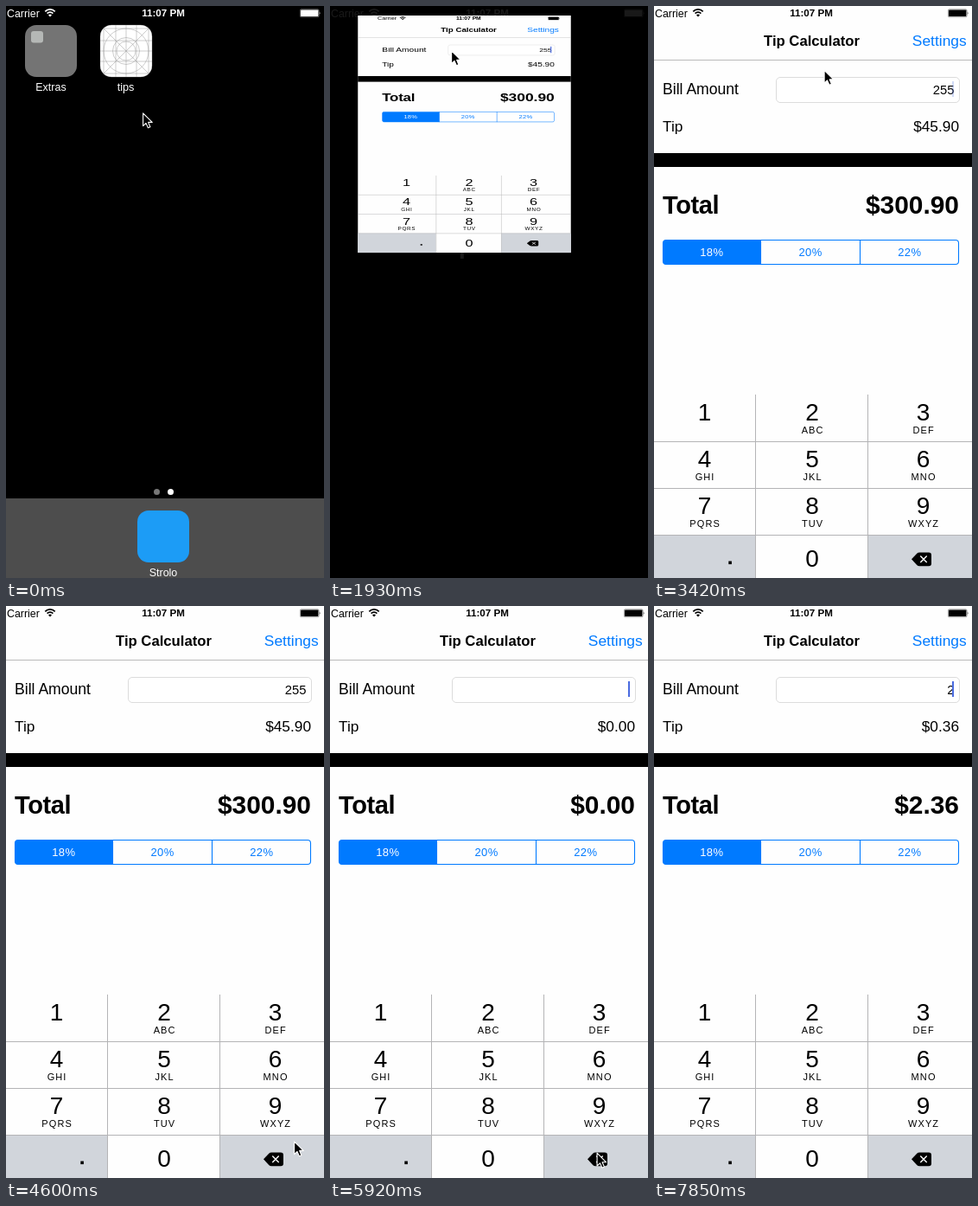
Recreate the animation shown at these times as an HTML page. Size 368x661 px, loop 8 s.

```html
<!DOCTYPE html>
<html lang="en">
<head>
<meta charset="utf-8">
<title>Tip Calculator</title>
<style>
html, body { margin: 0; width: 100%; height: 100%; overflow: hidden; background: #000; }
svg { display: block; width: 368px; height: 661px; }
text { font-family: "Liberation Sans", Arial, sans-serif; white-space: pre; }
</style>
</head>
<body>
<svg id="stage" viewBox="0 0 368 661" xmlns="http://www.w3.org/2000/svg"></svg>
<script>
const LOOP = 8000, START = 1050, STEP = 147.8, BLUE = '#007aff', KEY_GRAY = '#d1d5db';

// ---- markup helpers ----
const rect = (x, y, w, h, fill, extra = '') =>
  `<rect x="${x}" y="${y}" width="${w}" height="${h}" fill="${fill}" ${extra}/>`;
const text = (x, y, size, str, extra = '') =>
  `<text x="${x}" y="${y}" font-size="${size}" ${extra}>${str}</text>`;
const path = (d, extra = '') => `<path d="${d}" ${extra}/>`;
const circle = (x, y, r, extra = '') => `<circle cx="${x}" cy="${y}" r="${r}" ${extra}/>`;
const MID = 'text-anchor="middle"', END = 'text-anchor="end"', BOLD = 'font-weight="bold"';

function statusBar(color) {
  return `<g fill="${color}">` +
    text(1, 12.6, 12.4, 'Carrier') +
    path('M45.3 6.3a8 8 0 0 1 11.4 0M47.6 8.6a4.8 4.8 0 0 1 6.8 0',
      `fill="none" stroke="${color}" stroke-width="1.7"`) +
    path('M51 12.4l-2-2a2.8 2.8 0 0 1 4 0z') +
    text(182, 12.4, 11.6, '11:07 PM', `${MID} ${BOLD}`) +
    rect(340.3, 3.8, 21.8, 9, 'none', `rx="1.5" stroke="${color}" stroke-width=".6" opacity=".6"`) +
    rect(341, 4.5, 20.4, 7.6, color, 'rx=".8"') +
    path('M362.8 6.6q1.4 1.6 0 3.3z') + '</g>';
}

function gridIcon() {
  let d = 'M109 22l60 60M169 22l-60 60';
  for (const p of [4, 18, 30, 42, 56]) d += `M${109 + p} 22v60M109 ${22 + p}h60`;
  return rect(109, 22, 60, 60, '#fff', 'rx="13"') +
    '<g clip-path="url(#tile)" fill="none" stroke="#999" stroke-width=".5">' + path(d) +
    [11, 15.5, 26].map(r => circle(139, 52, r)).join('') + '</g>' +
    rect(109.2, 22.2, 59.6, 59.6, 'none', 'rx="12.8" stroke="#bbb" stroke-width=".4"') +
    rect(109, 22, 60, 60, '#000', 'rx="13" id="tint"');
}

function homeScreen() {
  return rect(22, 22, 60, 60, '#747474', 'rx="13"') +
    rect(29, 29, 14, 13.5, '#b5b8b6', 'rx="3"') +
    gridIcon() +
    circle(174.5, 561.5, 3.5, 'fill="#777"') + circle(190.5, 561.5, 3.5, 'fill="#fff"') +
    rect(-300, 569, 1000, 300, '#4d4d4d') +
    rect(152, 583, 60, 60, '#1c9cf6', 'rx="13"') +
    `<g fill="#fff" ${MID}>` + text(52, 98, 12.5, 'Extras') +
    text(138.5, 98, 12.7, 'tips') + text(182, 659, 12.5, 'Strolo') + '</g>';
}

function keypad() {
  const cols = [58.5, 183, 311.5];
  const letters = ['', 'ABC', 'DEF', 'GHI', 'JKL', 'MNO', 'PQRS', 'TUV', 'WXYZ'];
  let s = rect(-300, 611, 417, 55, KEY_GRAY) +
    rect(247, 611, 421, 55, KEY_GRAY, 'id="delKey"') +
    rect(118, 449, 129, 54, KEY_GRAY, 'id="twoKey"') +
    path('M117.5 449v217M247.5 449v217M-300 503.5h1000M-300 557.5h1000M-300 611.5h1000',
      'stroke="#b4b4b6" stroke-width="1"');
  letters.forEach((word, i) => {
    const x = cols[i % 3], y = 479 + 54 * Math.floor(i / 3);
    s += text(x, y, 28, i + 1, MID) +
      text(x + .6, y + 15, 11, word, `${MID} letter-spacing="1.1"`);
  });
  return s + text(183, 648, 28, 0, MID) + rect(86.3, 641.5, 3.6, 3.6, '#000') +
    path('M298 639.3l6.2-6.6q1.2-1.2 3-1.2h10.8a3 3 0 0 1 3 3v9.8a3 3 0 0 1-3 3h-10.8q-1.8 0-3-1.2z') +
    path('M308.3 635.6l7.4 7.4M315.7 635.6l-7.4 7.4', 'stroke="#fff" stroke-width="1.4"');
}

function segments() {
  const label = (x, str, color) =>
    text(x, 289, 13, str, `${MID} fill="${color}" letter-spacing=".4"`);
  return path('M124 270.5H14a3.5 3.5 0 0 0-3.5 3.5v21a3.5 3.5 0 0 0 3.5 3.5H124z', `fill="${BLUE}"`) +
    rect(10.5, 270.5, 342, 28, 'none', `rx="3.5" stroke="${BLUE}" stroke-width="1.1"`) +
    path('M123.5 270v29M238.5 270v29', `stroke="${BLUE}" stroke-width="1.1"`) +
    label(66.8, '18%', '#fff') + label(181, '20%', BLUE) + label(295.8, '22%', BLUE);
}

function appScreen() {
  return rect(-300, 0, 1000, 666, '#fefefe') + statusBar('#000') +
    text(182.5, 46, 16.7, 'Tip Calculator', `${MID} ${BOLD}`) +
    text(361.7, 46, 17.4, 'Settings', `${END} fill="${BLUE}"`) +
    rect(-300, 62, 1000, 1, '#bbb') +
    text(10, 102, 17.6, 'Bill Amount') +
    rect(141.5, 82.5, 212, 29, '#fff', 'rx="4.5" stroke="#dcdcdc"') +
    text(347.5, 102, 14.8, '', `${END} id="bill"`) +
    rect(345, 87, 2, 18, '#4a6be0', 'id="caret"') +
    text(10, 144.5, 17.3, 'Tip') + text(353, 144.5, 17.3, '', `${END} id="tip"`) +
    rect(-300, 170, 1000, 16, '#000') +
    text(10, 240, 29, 'Total', `${BOLD} letter-spacing="-.4"`) +
    text(353, 240, 29.9, '', `${END} ${BOLD} id="total"`) +
    segments() + keypad();
}

const stage = document.getElementById('stage');
stage.innerHTML =
  `<defs><clipPath id="tile">${rect(109, 22, 60, 60, '#fff', 'rx="13"')}</clipPath>` +
  `<clipPath id="window">${rect(0, 0, 368, 661, '#fff', 'id="frame"')}</clipPath></defs>` +
  rect(0, 0, 368, 661, '#000') +
  `<g id="desk"><g id="home">${homeScreen()}</g>${statusBar('#fff')}</g>` +
  `<g id="app" clip-path="url(#window)"><g id="screen">${appScreen()}</g></g>` +
  path('M.6 .8v14.8l3.4-3.2 2.4 5.4 2.5-1.1-2.3-5.3h4.6z',
    'id="cursor" fill="#000" stroke="#fff" stroke-width="1.1" stroke-linejoin="round"');

const el = {};
stage.querySelectorAll('[id]').forEach(node => el[node.id] = node);
const set = (id, attrs) => { for (const k in attrs) el[id].setAttribute(k, attrs[k]); };
const clamp = v => Math.min(1, Math.max(0, v));

const cursorKeys = [[-1, 158, 123], [0, 157, 119], [1, 151, 90], [2, 142, 57], [3, 140, 51], [6, 140, 51],
  [8, 141, 52], [10, 152, 57], [12, 190, 71], [13, 196.5, 73.5], [18, 196.5, 73.5], [20, 207, 92],
  [21, 235, 150], [22, 285, 260], [23, 333, 402], [24, 333, 618], [25, 316, 629],
  [26, 309, 633], [39, 308, 630], [40, 292, 600], [42, 205, 500], [43, 186, 474]];
const shrinkKeys = [[4, 1], [5, .9973], [6, .5], [7, .0505], [8, .012], [9, .002], [10, 0]];
const billKeys = [[-9, '255'], [27, '25'], [29, '2'], [32, ''], [44, '2']];
const caretKeys = [[-9, 1], [16, .25], [17, 0], [19, 1], [23, .25], [24, 0], [25, 1], [36, .5], [37, 0], [39, 1]];
const deleteDown = [27, 29, 31, 32];

const held = (keys, n) => keys.reduce((v, k) => n >= k[0] ? k[1] : v, keys[0][1]);

function tween(keys, n) {
  const i = keys.findIndex(k => k[0] > n);
  if (i === 0) return keys[0].slice(1);
  if (i < 0) return keys[keys.length - 1].slice(1);
  const a = keys[i - 1], b = keys[i], u = (n - a[0]) / (b[0] - a[0]);
  return a.slice(1).map((v, j) => v + (b[j + 1] - v) * u);
}

// r runs from 1 (app is the size of its icon) to 0 (app fills the stage)
function launch(n) {
  const [r] = tween(shrinkKeys, n);
  const zoom = 5.13 * (1 - r);
  set('home', { transform: `translate(${-130 * zoom} ${-26 * zoom}) scale(${1 + zoom})` });
  set('desk', { opacity: clamp(2 * r - .9) });
  set('tint', { opacity: n >= 4 ? .4 : 0 });

  const sx = 1 - .837 * r, sy = Math.max(.09, (1 - r) ** 1.28);
  const left = 20 * r + 89 * r * r, right = 368 - 158 * r - 41 * r * r;
  const top = 20 * r, bottom = 22 * r + 666 * sy;
  set('screen', { transform: `translate(${109 * r} ${22 * r}) scale(${sx} ${sy})` });
  set('frame', { x: left, y: top, width: right - left, height: bottom - top });
  set('app', { opacity: clamp((.95 - r) * 2.3) });
}

function calculator(n) {
  const bill = held(billKeys, n);
  el.bill.textContent = bill;
  el.tip.textContent = '$' + (bill * .18).toFixed(2);
  el.total.textContent = '$' + (bill * 1.18).toFixed(2);
  set('caret', { opacity: held(caretKeys, n) });
  set('delKey', { fill: deleteDown.includes(n) ? '#fefefe' : KEY_GRAY });
  set('twoKey', { opacity: n === 44 ? 1 : 0 });
}

function draw(ms) {
  const n = Math.floor((ms % LOOP - START + 20) / STEP);
  const [x, y] = tween(cursorKeys, n);
  launch(n);
  calculator(n);
  set('cursor', { transform: `translate(${x} ${y})`, visibility: n < 46 ? 'visible' : 'hidden' });
}

const t0 = performance.now();
function tick() {
  draw(performance.now() - t0);
  requestAnimationFrame(tick);
}
tick();
</script>
</body>
</html>
```
